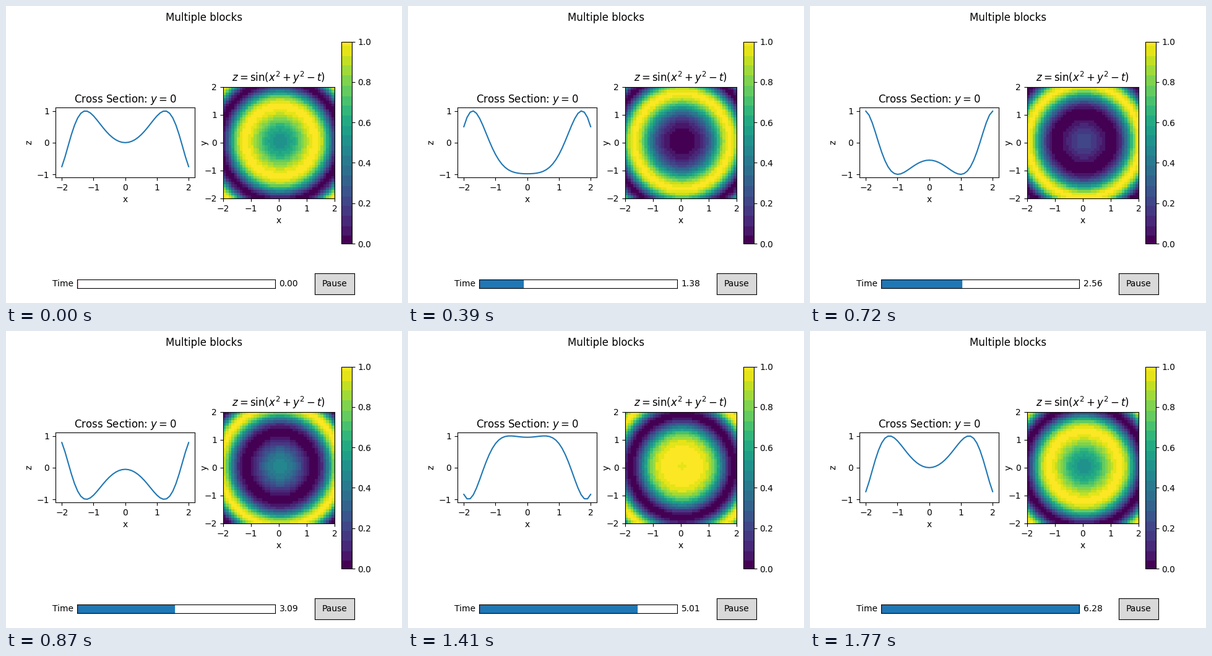
A matplotlib script for the animation above (1.8 s loop, 640 by 480 pixels).

```python
import numpy as np
import matplotlib.pyplot as plt
from matplotlib.animation import FuncAnimation
from matplotlib.cm import ScalarMappable
from matplotlib.colors import ListedColormap, Normalize

FRAMES = 60
times = np.linspace(0, 2 * np.pi, FRAMES)
x = np.linspace(-2, 2, 41)
X, Y = np.meshgrid(x, x)

plt.rcParams["font.family"] = "DejaVu Sans"


def banded_viridis():
    """Viridis reduced to 21 flat bands, narrower at both ends."""
    edges = np.linspace(0.036, 0.982, 20)
    mids = np.concatenate(([0], (edges[:-1] + edges[1:]) / 2, [0.995]))
    band = np.digitize(np.linspace(0, 1, 256), edges)
    return ListedColormap(plt.get_cmap("viridis")(mids[band]))


def surface(t):
    return np.sin(X**2 + Y**2 - t)


def control_axes(rect, color="white"):
    ax = fig.add_axes(rect, facecolor=color)
    ax.set(xticks=[], yticks=[], ylim=(0, 1))
    return ax


fig, (ax1, ax2) = plt.subplots(1, 2, figsize=(6.4, 4.8), dpi=100)
fig.subplots_adjust(left=0.125, right=0.9, bottom=0.2, top=0.88, wspace=0.2)
fig.suptitle("Multiple blocks")

# Cross section
line, = ax1.plot(x, np.sin(x**2), color="#1f77b4", lw=1.5)
ax1.set(aspect="equal", xlim=(-2.2, 2.2), ylim=(-1.1, 1.1),
        xticks=[-2, -1, 0, 1, 2], yticks=[-1, 0, 1], xlabel="x", ylabel="z")
ax1.set_title("Cross Section: $y=0$")

# Heat map: each cell takes the value at its lower left corner
cmap = banded_viridis()
mesh = ax2.pcolormesh(X, Y, surface(0)[:-1, :-1], cmap=cmap, vmin=-1, vmax=1)
ax2.set(aspect="equal", xlim=(-2, 2), ylim=(-2, 2),
        xticks=range(-2, 3), yticks=range(-2, 3), xlabel="x")
ax2.set_ylabel("y", labelpad=-5)
ax2.set_title(r"$z=\sin(x^2+y^2-t)$", y=1)
fig.colorbar(ScalarMappable(Normalize(0, 1), cmap), ax=ax2)

# Time slider
slider = control_axes([0.18, 0.05, 0.5, 0.03])
slider.set_xlim(0, FRAMES - 1)
fill = slider.axvspan(0, 1, color="#1f77b4")
slider.axvline(0, color="r", lw=1)
slider.text(-0.02, 0.5, "Time", transform=slider.transAxes,
            ha="right", va="center")
readout = slider.text(1.02, 0.5, "", transform=slider.transAxes,
                      ha="left", va="center")

# Pause button
button = control_axes([0.78, 0.03, 0.1, 0.07], "0.85")
button.text(0.5, 0.5, "Pause", transform=button.transAxes,
            ha="center", va="center")


def update(i):
    t = times[i]
    line.set_ydata(np.sin(x**2 - t))
    mesh.set_array(surface(t)[:-1, :-1])
    fill.set_width(i)
    readout.set_text(f"{t:.2f}")
    return line, mesh, fill, readout


anim = FuncAnimation(fig, update, frames=FRAMES, interval=30, repeat=True,
                     repeat_delay=0, blit=False)
plt.show()
```
